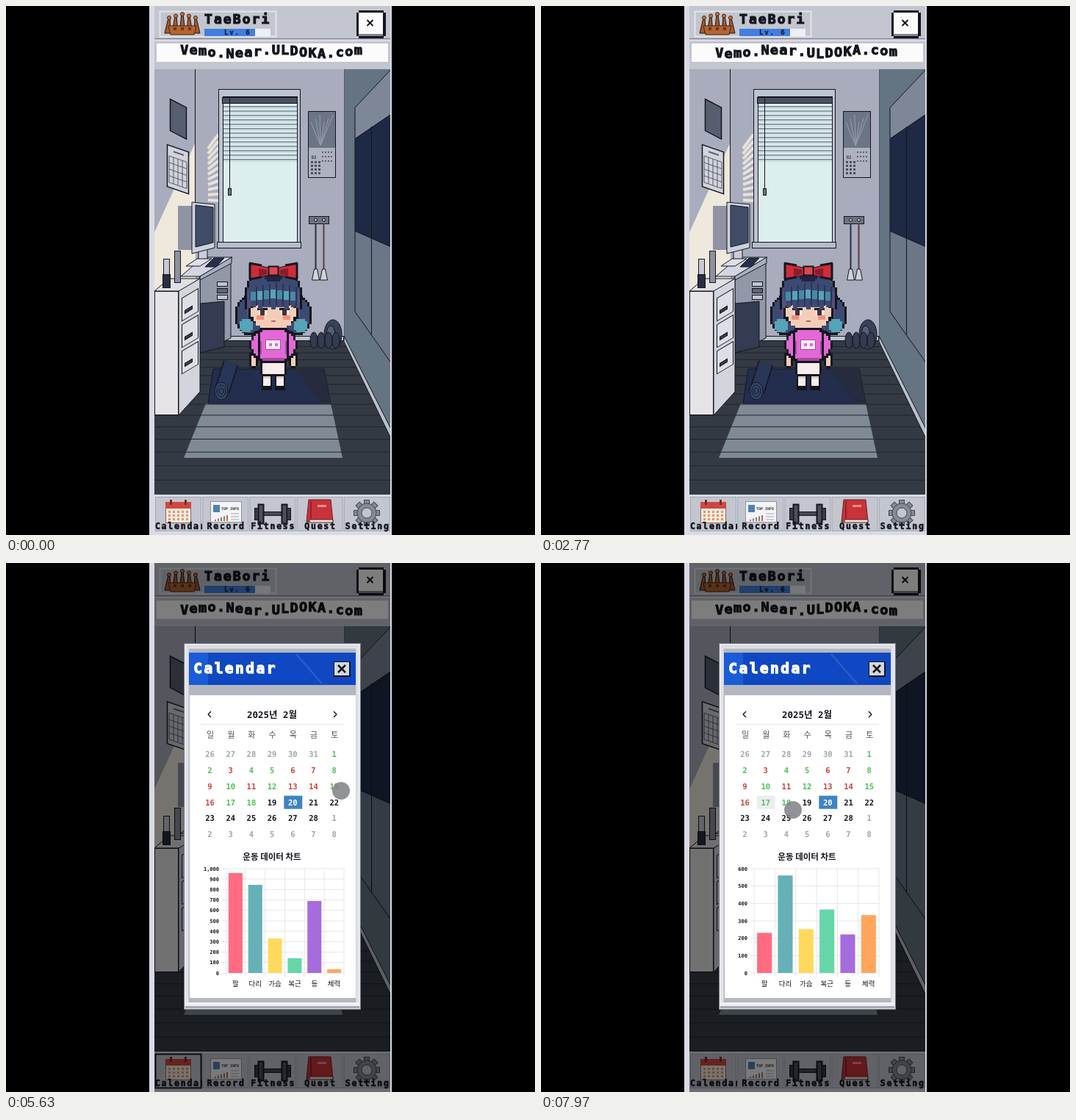
Write an HTML page with a canvas that moves like this. It is 720 px wide and 720 px high and loops after 8 s.

```html
<!DOCTYPE html>
<html lang="ko">
<head>
<meta charset="utf-8">
<style>
html, body { margin: 0; width: 100%; height: 100%; overflow: hidden; background: #000; }
canvas { display: block; width: 100vw; height: 100vh; }
</style>
</head>
<body>
<canvas id="stage" width="720" height="720"></canvas>
<script>
const ctx = document.getElementById('stage').getContext('2d');
const LOOP = 8000, CENTER = 364, CELL = 3;
const INK = '#14161e', EDGE = '#d9dae4', BAR = '#c3c5cf', WALL = '#a9acbc', PAPER = '#fbfbfc';
const MONO = '"DejaVu Sans Mono", monospace';
const HANGUL = '"Noto Sans CJK KR", "Noto Sans CJK", sans-serif';

// ---------- helpers ----------
const times = (n, draw) => { for (let i = 0; i < n; i++) draw(i); };
const sides = draw => [-1, 1].forEach(draw);

function box(x, y, w, h, fill, line, width = 1) {
  if (fill) { ctx.fillStyle = fill; ctx.fillRect(x, y, w, h); }
  if (line) { ctx.strokeStyle = line; ctx.lineWidth = width; ctx.strokeRect(x + .5, y + .5, w - 1, h - 1); }
}
function poly(fill, points, line = INK) {
  ctx.beginPath();
  points.forEach(([x, y]) => ctx.lineTo(x, y));
  ctx.closePath();
  ctx.fillStyle = fill; ctx.fill();
  if (line) { ctx.strokeStyle = line; ctx.lineWidth = 1; ctx.stroke(); }
}
// Four-sided shapes with upright sides, or with level top and bottom.
const slab = (fill, x1, top1, low1, x2, top2, low2, line) =>
  poly(fill, [[x1, top1], [x2, top2], [x2, low2], [x1, low1]], line);
const tier = (fill, y1, left1, right1, y2, left2, right2, line) =>
  poly(fill, [[left1, y1], [right1, y1], [right2, y2], [left2, y2]], line);

function seg(color, x1, y1, x2, y2, width = 1) {
  ctx.strokeStyle = color; ctx.lineWidth = width;
  ctx.beginPath(); ctx.moveTo(x1, y1); ctx.lineTo(x2, y2); ctx.stroke();
}
function oval(fill, x, y, rx, ry = rx, line) {
  ctx.beginPath(); ctx.ellipse(x, y, rx, ry, 0, 0, 2 * Math.PI);
  if (fill) { ctx.fillStyle = fill; ctx.fill(); }
  if (line) { ctx.strokeStyle = line; ctx.lineWidth = 1; ctx.stroke(); }
}
function cross(x, y, r, width) {
  sides(s => seg(INK, x - r, y - r * s, x + r, y + r * s, width));
}
// Rounded blob with stair-stepped pixel edges.
function blob(fill, x, y, rx, ry, power = 2.5) {
  for (let dy = -ry; dy < ry; dy += CELL) {
    const v = Math.min(1, Math.abs(dy + CELL / 2) / ry);
    const half = Math.round(rx * (1 - v ** power) ** (1 / power) / CELL) * CELL;
    box(x - half, y + dy, half * 2, CELL, fill);
  }
}
function label(text, x, y, size, color, { align = 'center', font = MONO, weight = 'bold', fat = 0 } = {}) {
  ctx.font = `${weight} ${size}px ${font}`;
  ctx.textAlign = align; ctx.textBaseline = 'alphabetic';
  ctx.fillStyle = ctx.strokeStyle = color; ctx.lineWidth = fat;
  ctx.fillText(text, x, y + size * .365);
  if (fat) ctx.strokeText(text, x, y + size * .365);
}
// Letters on a fixed pitch; lift(i) moves each one vertically.
function spaced(text, x, y, size, pitch, color, fat = 1, lift = () => 0) {
  [...text].forEach((c, i) => label(c, x + pitch * (i + .5), y + lift(i), size, color, { fat }));
}
function within(setup, draw) { ctx.save(); setup(); draw(); ctx.restore(); }
const clipped = (x, y, w, h, draw) =>
  within(() => { ctx.beginPath(); ctx.rect(x, y, w, h); ctx.clip(); }, draw);
const sheared = (x, y, slope, draw) => within(() => ctx.transform(1, slope, 0, 1, x, y), draw);

// ---------- room ----------
// Part of the right wall between two rays from the vanishing point.
function rightWall(fill, x, k1, k2, line) {
  const ray = (k, px) => 257 + k * (px - 363);
  slab(fill, x, ray(k1, x), ray(k2, x), 524, ray(k1, 524), ray(k2, 524), line);
}
function drawShell() {
  box(202, 86, 322, 370, WALL);
  slab('#eee8dd', 202, 308, 410, 258, 185, 410, null);
  seg(INK, 257.5, 86, 257.5, 270);
  box(258, 449, 202, 7, '#bfc3d0', INK);
  box(202, 456, 322, 210, '#343a43');
  tier('#7f8a95', 541, 272, 442, 615, 242, 458, null);
  times(14, i => seg('#20242c', 202, 463.5 + 8 * i + .46 * i * i, 524, 463.5 + 8 * i + .46 * i * i));

  clipped(460, 86, 64, 520, () => {
    rightWall('#657482', 460, -6, 2.05, '#3d4a58');
    rightWall('#b9bfcb', 460, 1.98, 2.06);
    rightWall('#7d8797', 475, -1.06, -.68);
    rightWall('#1e2a44', 475, -.68, .44);
    rightWall('#6b7687', 475, .44, 1.42);
  });
  seg(INK, 497.5, 164, 497.5, 447);
}
function drawWindow() {
  times(11, i => seg('#e6e2da', 289, 175 + i * 9, 275, 194 + i * 7, 4));
  box(289, 113, 112, 217, '#bcc3d1', INK);
  box(295, 123, 102, 199, '#dcefee', INK);
  box(294, 124, 103, 9, '#4a5162', INK);
  times(13, i => { box(296, 136 + i * 6, 100, 2, '#8e9aaa'); box(296, 139 + i * 6, 100, 1, '#c2d2d8'); });
  seg(INK, 304.5, 125, 304.5, 250);
  box(302, 248, 5, 10, '#6d7584', INK);
  box(287, 321, 115, 9, '#b5bccb', INK);
}
function drawWallItems() {
  sheared(223, 126, .52, () => box(0, 0, 23, 44, '#575e70', INK, 1.5));
  sheared(219, 188, .35, () => {
    box(0, 0, 30, 58, '#d2d4dc', INK, 1.5);
    box(9, 6, 14, 2, '#555a68');
    times(5, i => { seg('#555a68', 3, 15 + i * 9, 27, 15 + i * 9); seg('#555a68', 3 + i * 6, 15, 3 + i * 6, 51); });
  });
  box(411, 143, 38, 91, '#aeb2c0', INK);
  box(412, 144, 36, 49, '#6c7586');
  times(6, i => seg('#959eab', 428, 190, 415 + i * 6, 158 - (i % 3) * 5));
  label('02', 419, 206, 6, '#3c404c');
  times(12, i => {
    box(430 + i % 4 * 4, 198 + Math.floor(i / 4) * 6, 2, 2, '#59606e');
    box(415 + i % 3 * 5, 211 + Math.floor(i / 3) * 5, 3, 3, '#4b505e');
  });
  box(412, 286, 28, 11, '#6c7382', INK);
  sides(s => {
    const x = 427 + 5.5 * s;
    oval('#c2c6d0', x, 291, 2, 2, INK);
    seg(s < 0 ? '#2b303c' : '#5d3a44', x, 296, x, 360, 2);
    tier('#d0d3dc', 358, x - 2, x + 2, 373, x - 5, x + 5);
  });
}
function drawDesk() {
  box(234, 272, 19, 60, '#8f93a4');
  slab('#9398a9', 264, 362, 472, 306, 350, 452);
  slab('#343b52', 264, 405, 472, 297, 402, 464);
  times(3, i => box(287, 375 + i * 9, 15, 7, i % 2 ? '#5f6677' : '#c1c5d0', INK));
  tier('#d3d6e0', 342, 268, 308, 368, 238, 264);
  slab('#a9aec0', 264, 368, 373, 307, 342, 350);

  slab('#c9cdd9', 262, 334, 350, 274, 328, 344);
  tier('#dde0e8', 344, 260, 280, 354, 245, 264);
  slab('#cdd1dc', 253, 267, 337, 284, 270, 329);
  slab('#3f4d68', 258, 271, 328, 282, 274, 322);
  tier('#26304a', 343, 283, 297, 355, 271, 286);

  tier('#dfdfe4', 371, 222, 264, 388, 202, 237);
  box(202, 388, 33, 169, '#e6e4e6', INK);
  slab('#d3d4dc', 235, 388, 557, 264, 371, 525);
  sheared(235, 388, -.6, () => times(3, i => {
    box(4, 12 + i * 36, 23, 32, '#dedee5', INK);
    box(8, 31 + i * 36, 11, 5, '#3a3f4c', INK);
  }));
  box(214, 344, 9, 40, '#c6c9d3', INK);
  box(213, 365, 11, 19, '#262f40', INK);
  box(229, 333, 9, 44, '#8d92a0', INK);
}
function drawFloorItems() {
  oval('#3a4258', 445, 447, 12, 20, INK);
  oval('#555e74', 442, 448, 6, 13, INK);
  seg('#8b92a0', 418, 456, 442, 453, 4);
  times(4, i => oval('#333c50', 419 + i * 10, 455, 5, 11, INK));

  tier('#232d4e', 494, 282, 433, 541, 275, 442);
  tier('#262b3d', 494, 394, 433, 541, 428, 442, null);
  seg(INK, 294, 524, 306, 486, 21);
  seg('#293657', 294, 524, 306, 486, 18);
  times(3, i => oval(i ? null : '#34456a', 293, 524, 9 - i * 3, 12 - i * 4, INK));
}

// ---------- girl ----------
function drawGirl() {
  const hair = '#3c4a72', shine = '#57a3b8', skin = '#f4cdb9', pink = '#e368d6', shade = '#a94aa6';
  const outlined = (fill, x, y, rx, ry, power) => {
    blob(INK, x, y, rx + CELL, ry + CELL, power); blob(fill, x, y, rx, ry, power);
  };
  sides(s => outlined(hair, CENTER + 31 * s, 421, 18, 24, 2.2));
  outlined(hair, CENTER, 398, 36, 36);
  sides(s => {
    blob(shine, CENTER + 37 * s, 435, 9, 9);
    blob('#54507c', CENTER + 33 * s, 406, 3, 18);
    outlined(skin, CENTER + 27 * s, 481, 3, 9);
    box(CENTER + 9 * s - 7, 498, 14, 25, INK);
    box(CENTER + 9 * s - 5, 500, 10, 8, skin);
    box(CENTER + 9 * s - 5, 507, 10, 10, '#f3eff2');
  });
  outlined('#f6ecec', CENTER, 492, 15, 9, 6);
  sides(s => outlined(pink, CENTER + 21 * s, 461, 8, 15));
  outlined(pink, CENTER, 462, 18, 21, 6);
  box(CENTER - 15, 479, 30, 4, shade);
  sides(s => box(CENTER + 17 * s - 1, 456, 2, 18, shade));
  box(353, 454, 21, 14, '#fbeef4', shade);
  sides(s => box(CENTER + 4 * s - 2, 459, 4, 4, pink));

  sides(s => outlined(skin, CENTER + 28 * s, 418, 3, 7));
  blob(skin, CENTER, 414, 27, 24, 4);
  blob(hair, CENTER, 387, 34, 22, 3);
  sides(s => {
    const x = CENTER + 15 * s;
    box(x - 7, 411, 14, 3, INK);
    box(x - 5, 414, 11, 7, '#fff6f0');
    box(x - 3, 413, 6, 8, '#4c2c32');
    box(x + 3 * s - 5, 421, 10, 6, '#f08f7e');
  });
  times(7, i => {
    const x = CENTER + (i - 3) * 9, drop = Math.abs(i - 3);
    box(x - 4, 386 + drop, 7, 12, i % 2 ? shine : '#468aa4');
    box(x - 3, 404, 6, 6 + i % 2 * 3, hair);
    box(x + 3, 376 + drop * 2, 2, 32 - drop * 2, '#28345a');
  });
  blob('#22253f', CENTER, 368, 12, 8);
  box(CENTER - 3, 428, 6, 2, '#b9655f');

  sides(s => {
    slab('#cf2c3b', CENTER + 4 * s, 357, 366, CENTER + 32 * s, 350, 372);
    slab('#8a1c2f', CENTER + 9 * s, 359, 365, CENTER + 20 * s, 357, 368, null);
    [350, 372].forEach(y => seg(INK, CENTER + 16 * s, y + (y < 360 ? 3 : -3), CENTER + 33 * s, y, 3));
    seg(INK, CENTER + 32 * s, 350, CENTER + 32 * s, 372, 3);
  });
  box(357, 354, 14, 13, '#e04452', INK, 2);
}

// ---------- header and navigation ----------
function drawCrown() {
  times(5, i => {
    const x = 222 + i * 9, tip = 16 - 2.5 * (2 - Math.abs(i - 2));
    tier('#a85a2c', tip, x - 1, x + 1, 37, x - 6 + i, x + 2 + i);
    oval('#c47440', x, tip, 2.5, 2.5, '#472510');
  });
  tier('#b5652f', 27, 221, 259, 39, 224, 256, '#472510');
  times(3, i => box(228 + i * 10, 29, 4, 4, '#71331c'));
}
function drawHeader(t) {
  box(202, 0, 322, 86, BAR);
  box(209, 7, 159, 35, null, '#e3e5ec', 2);
  drawCrown();
  spaced('TaeBori', 269, 17, 18, 12.9, INK, 1.2);
  box(270, 31, 90, 10, '#eceff4'); box(270, 31, 69, 10, '#417fde');
  spaced('Lv. 6', 296, 36, 9, 7.3, '#17203a', .3);

  box(480, 6, 34, 38, INK); box(477, 9, 40, 32, INK);
  box(480, 9, 33, 29, PAPER); box(480, 38, 33, 3, '#80838f');
  cross(495.5, 23, 4, 2);
  seg('#7b7e8a', 202, 44.5, 523, 44.5);
  box(202, 46, 322, 2, EDGE);
  box(205, 51, 315, 25, PAPER);
  const crest = .2 + t / 76.8;
  spaced('Vemo.Near.ULDOKA.com', 236.5, 61.4, 18.5, 12.45, INK, 1.1,
    i => -2.5 * Math.cos(2 * Math.PI * (i - crest) / 10));
}

function calendarIcon() {
  box(-18, -13, 35, 27, '#f2eae0', '#8a6a5c');
  box(-18, -15, 35, 9, '#d0473f');
  sides(s => box(s * 10 - 2, -18, 3, 7, '#6d3131'));
  times(15, i => box(-14 + i % 5 * 6, -3 + Math.floor(i / 5) * 5, 3, 3, '#e0986c'));
}
function recordIcon() {
  box(-21, -16, 43, 29, '#f3f4f6', '#9195a2');
  box(-17, -11, 9, 10, '#4d82b4');
  label('TOP INFO', 6, -6, 5, '#2c303c');
  times(5, i => box(-15 + i * 4, 9 - i * 1.5, 2, 2 + i * 1.5, i % 2 ? '#4d9a79' : '#d95a50'));
  times(3, i => seg('#a4a9b4', 7, 1 + i * 4, 18, 1 + i * 4));
}
function dumbbellIcon() {
  box(-13, -2, 26, 6, '#464954', INK);
  sides(s => { box(s * 16 - 4, -12, 8, 27, '#4d505c', INK, 2); box(s * 22 - 3, -7, 6, 17, '#363943', INK); });
}
function bookIcon() {
  tier('#c9323a', -18, -15, 15, 12, -18, 18, '#69211d');
  tier('#e8e2de', 9, -14, 18, 13, -14, 18, '#69211d');
  seg('#8e2329', -12, -16, -12, 8, 2);
  box(-3, -11, 12, 3, '#ee9088');
}
function gearIcon() {
  times(8, i => within(() => ctx.rotate(i * Math.PI / 4), () => box(-4, -18, 8, 8, '#868a95', '#444853')));
  oval('#868a95', 0, 0, 13, 13, '#444853');
  oval(BAR, 0, 0, 7, 7, '#444853');
}
const NAV = { Calendar: calendarIcon, Record: recordIcon, Fitness: dumbbellIcon, Quest: bookIcon, Setting: gearIcon };

function drawNav(focused) {
  box(202, 665, 322, 55, EDGE);
  Object.entries(NAV).forEach(([name, icon], i) => {
    const x = 203 + i * 64.2;
    box(x, 668, 63, 47, BAR, '#a5a8b4');
    within(() => ctx.translate(Math.round(x + 31.5), 690), icon);
    clipped(x - 1, 668, 65, 50, () =>
      spaced(name, Math.max(202, x + 31.5 - name.length * 4.35), 708, 11.5, 8.7, INK, .6));
  });
  if (focused) box(203, 668, 63, 47, null, INK, 2);
}

// ---------- calendar window ----------
const REST_DAYS = [3, 6, 7, 9, 11, 13, 14, 16], TODAY = 20, FIRST_CELL = 6;
const COLORS = ['#ff6b81', '#66b0b8', '#ffd95c', '#66d6a8', '#a66bdc', '#ffa65c'];
const PARTS = ['팔', '다리', '가슴', '복근', '등', '체력'];
const MONTH_TOTAL = [958, 845, 331, 141, 690, 36];
const DAY_TOTAL = [230, 559, 251, 364, 221, 332];
const SHOWS = [
  { at: 4050, max: 1000, left: 299, values: MONTH_TOTAL },
  { at: 6050, day: 15, max: 600, left: 290, values: DAY_TOTAL },
  { at: 7300, day: 17, max: 600, left: 290, values: DAY_TOTAL.map(v => v * 1.015) }
];

function dayColor(day, inMonth) {
  if (!inMonth) return '#a2a4aa';
  if (day === TODAY) return '#fff';
  if (day > 18) return INK;
  return REST_DAYS.includes(day) ? '#cb4438' : '#4dc052';
}
function drawMonth(picked) {
  label('2025년 2월', 362, 206, 12.5, INK, { font: `"DejaVu Sans Mono", ${HANGUL}` });
  sides(s => sides(v => seg(INK, 362.5 + s * 87.5, 206, 362.5 + s * 83.5, 206 + v * 4, 1.4)));
  seg('#e2e3e6', 265, 219.5, 460, 219.5);
  times(42, i => {
    const x = 277.5 + i % 7 * 28.2, y = 260 + Math.floor(i / 7) * 21.9;
    const n = i - FIRST_CELL + 1, inMonth = n > 0 && n <= 28;
    const day = inMonth ? n : n <= 0 ? n + 31 : n - 28;
    if (i < 7) label('일월화수목금토'[i], x + .5, 234, 11, '#50525a', { font: HANGUL, weight: 'normal' });
    if (inMonth && day === picked) box(x - 12, y - 9, 25, 18, '#ecedf0');
    if (inMonth && day === TODAY) box(x - 12, y - 9, 25, 18, '#3f83c4');
    label(day, x, y, 10.5, dayColor(day, inMonth));
  });
}
function drawChart({ at, max, left, values }, t) {
  const bottom = 558, height = 142, right = 460, grid = '#e6e6ea';
  const grow = 1 - (1 - Math.min(1, (t - at) / 1000)) ** 4;
  const pitch = (right - left) / 6, width = pitch * .71;
  label('운동 데이터 차트', 362, 400, 11.5, INK, { font: HANGUL });
  for (let v = 0; v <= max; v += 100) {
    const y = bottom - height * v / max;
    seg(grid, left - 5, y, right, y);
    label(v.toLocaleString('en-US'), left - 9, y, 7, INK, { align: 'right' });
  }
  times(7, i => seg(grid, left + i * pitch, bottom - height, left + i * pitch, bottom + 5));
  values.forEach((v, i) => {
    const x = left + pitch * (i + .5), h = height * v / max * grow;
    box(x - width / 2, bottom - h, width, h, COLORS[i]);
    label(PARTS[i], x, 573, 9.5, INK, { font: HANGUL, weight: 'normal' });
  });
}
function drawModal(show, t) {
  box(202, 0, 322, 720, 'rgba(0,0,0,.5)');
  box(242, 109, 241, 499, '#d4d5dc', '#777a86');
  box(244, 111, 237, 495, null, '#eceef3', 2);
  box(247, 115, 231, 485, '#b4b6c0', '#e6e8ee', 2);
  box(249, 122, 227, 44, '#0f48c2');
  box(249, 122, 26, 44, '#1a5cd6');
  seg('#2d5fce', 395, 124, 430, 164, 2);
  spaced('Calendar', 254, 143, 19.5, 14.2, '#fff', 1.3);
  box(446, 134, 23, 21, INK); box(447, 135, 20, 18, '#d5d7de');
  cross(457, 144, 5, 2.5);
  box(250, 180, 226, 412, '#fff');
  box(244, 598, 237, 5, '#eff0f5'); box(244, 603, 237, 3, '#a5a7b2');
  drawMonth(show.day);
  drawChart(show, t);
}

// ---------- touch pointer ----------
const STOPS = [
  { x: 242, y: 707, from: 3690, to: 4250 },
  { x: 456, y: 310, from: 5350, to: 6050 },
  { x: 307, y: 327, from: 7150, to: 7450 },
  { x: 343, y: 336, from: 7970, to: LOOP }
];
function drawPointer(t) {
  const i = STOPS.findLastIndex(s => t >= s.from);
  if (i < 0) return;
  const a = STOPS[i], b = STOPS[i + 1] || a;
  const k = t <= a.to ? 0 : (t - a.to) / (b.from - a.to), ease = k * k * (3 - 2 * k);
  ctx.globalAlpha = Math.min(.85, (t - STOPS[0].from) / 160);
  oval('#7f8086', a.x + (b.x - a.x) * ease, a.y + (b.y - a.y) * ease, 12);
  ctx.globalAlpha = 1;
}

function drawScene(t) {
  const show = SHOWS.findLast(s => t >= s.at);
  box(0, 0, 720, 720, '#000');
  box(195, 0, 330, 720, EDGE);
  clipped(202, 0, 321, 720, () => {
    drawShell(); drawWindow(); drawWallItems(); drawDesk(); drawFloorItems(); drawGirl();
    drawHeader(t);
    drawNav(show === SHOWS[0]);
    if (show) drawModal(show, t);
    drawPointer(t);
  });
}
const start = performance.now();
function tick() {
  drawScene((performance.now() - start) % LOOP);
  requestAnimationFrame(tick);
}
tick();
</script>
</body>
</html>
```
